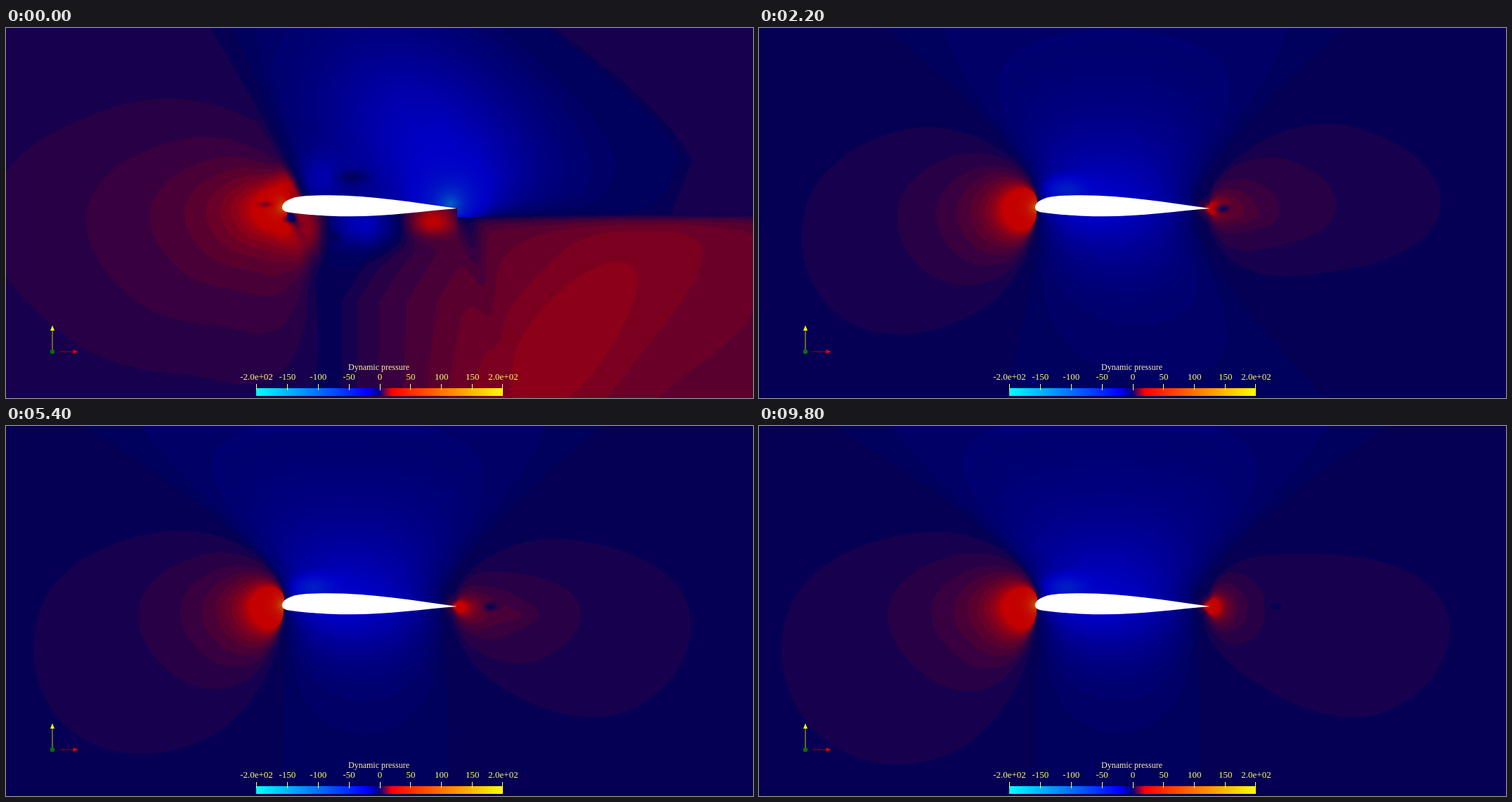
An HTML page with a canvas that plays this animation: 1063 px wide and 527 px high, repeating every 10000 ms.

```html
<!DOCTYPE html>
<html lang="en">
<head>
<meta charset="utf-8">
<title>Dynamic pressure</title>
<style>
html, body { margin: 0; width: 100%; height: 100%; overflow: hidden; background: #070055; }
canvas { display: block; width: 1063px; height: 527px; }
</style>
</head>
<body>
<canvas id="stage" width="1063" height="527"></canvas>
<script>
const W = 1063, H = 527, LOOP = 10000, STEP = 200;
const ctx = document.getElementById('stage').getContext('2d');
const image = ctx.createImageData(W, H);
const pixels = new Uint32Array(image.data.buffer);
const BINS = 1440;
const clamp = (v, a = 0, b = 1) => Math.min(b, Math.max(a, v));
const mix = (a, b, t) => a + (b - a) * t;
const bell = (x, y, cx, cy, sx, sy) => Math.exp(-(((x - cx) / sx) ** 2) - ((y - cy) / sy) ** 2);

// Each lobe has two contours as radii from straight up, over outwards, to straight down.
const leftKeys = [
  { t: 400, outer: [24, 125, 430, 600, 520, 245, 24], inner: [18, 95, 222, 280, 240, 160, 16], core: [3.2] },
  { t: 1400, outer: [20, 90, 230, 322, 295, 160, 17], inner: [16, 75, 145, 196, 180, 112, 13], core: [3.4] },
  { t: 3000, outer: [20, 88, 210, 335, 340, 187, 17], inner: [16, 72, 140, 198, 185, 125, 13], core: [3.4] },
  { t: 7200, outer: [20, 85, 205, 350, 362, 243, 18], inner: [16, 70, 140, 210, 190, 135, 13], core: [3.3] }
];
const rightKeys = [
  { t: 400, outer: [45, 118, 305, 325, 280, 130, 38], inner: [28, 98, 180, 195, 148, 92, 28], core: [2.3] },
  { t: 1400, outer: [20, 78, 182, 272, 112, 62, 22], inner: [16, 60, 115, 155, 75, 52, 16], core: [0.9] },
  { t: 3000, outer: [28, 95, 285, 385, 255, 132, 38], inner: [20, 75, 155, 205, 140, 78, 26], core: [1] },
  { t: 5400, outer: [24, 75, 190, 330, 290, 135, 40], inner: [18, 52, 95, 175, 145, 80, 28], core: [1] },
  { t: 7200, outer: [22, 68, 158, 310, 330, 150, 42], inner: [18, 42, 75, 170, 130, 75, 28], core: [1.1] },
  { t: 9800, outer: [22, 70, 150, 335, 295, 120, 45], inner: [20, 55, 72, 80, 78, 62, 28], core: [1.6] }
];
// edge: top left, top right, bottom left, bottom right of the suction zone.
// wake: vortex x, vortex strength, trailing bump.
const zoneKeys = [
  { t: 400, edge: [290, 740, 300, 710], wake: [644, 0, 0] },
  { t: 1400, edge: [190, 920, 320, 1000], wake: [652, 0.95, 0.5] },
  { t: 3000, edge: [150, 775, 360, 665], wake: [667, 0.95, 1.2] },
  { t: 5400, edge: [98, 865, 380, 645], wake: [689, 0.9, 1.6] },
  { t: 7200, edge: [95, 895, 385, 640], wake: [706, 0.9, 1.6] },
  { t: 9800, edge: [95, 905, 385, 645], wake: [735, 0.85, 0] }
];
const startLobe = {
  outer: [180, 280, 430, 600, 480, 370, 300],
  inner: [60, 120, 225, 343, 310, 235, 200],
  core: [1.7]
};

function poseAt(keys, t) {
  let i = 0;
  while (i < keys.length - 2 && t > keys[i + 1].t) i++;
  const a = keys[i], b = keys[i + 1];
  const k = clamp((t - a.t) / (b.t - a.t));
  const pose = {};
  for (const name in a) {
    if (name !== 't') pose[name] = a[name].map((v, j) => mix(v, b[name][j], k));
  }
  return pose;
}

// Log distance and angle bin of every pixel around one end of the wing.
function polar(cx, cy, side) {
  const log = new Float32Array(W * H), bin = new Uint16Array(W * H);
  for (let y = 0, i = 0; y < H; y++) {
    for (let x = 0; x < W; x++, i++) {
      const dx = (x + 0.5 - cx) * side, dy = y + 0.5 - cy;
      log[i] = Math.log(Math.hypot(dx, dy) + 0.01);
      bin[i] = Math.floor((Math.atan2(dy, dx) / Math.PI + 1) * BINS / 2) % BINS;
    }
  }
  return { log, bin };
}
const nose = polar(395, 255, -1);
const tail = polar(641, 257, 1);

function spline(list, u) {
  const i = Math.floor(u), f = u - i;
  const at = j => list[clamp(j, 0, list.length - 1)];
  const a = at(i - 1), b = at(i), c = at(i + 1), d = at(i + 2);
  return b + f / 2 * (c - a + f * (2 * a - 5 * b + 4 * c - d + f * (3 * (b - c) + d - a)));
}

function lobe(place, pose, back, heat) {
  const pad = (list, v) => [v, v, ...list, v, v];
  const outer = pad(pose.outer, back), inner = pad(pose.inner, back * 0.8);
  const l2 = new Float32Array(BINS), l3 = new Float32Array(BINS);
  const fall = new Float32Array(BINS), rise = new Float32Array(BINS);
  for (let i = 0; i < BINS; i++) {
    const u = clamp((i * 360 / BINS - 30) / 30, 0, 10);
    const r2 = Math.max(2.5, spline(inner, u));
    const r1 = Math.max(r2 * 1.15, spline(outer, u));
    const r3 = Math.min(r2 * 0.8, pose.core[0] * Math.sqrt(r2));
    l2[i] = Math.log(r2);
    l3[i] = Math.log(r3);
    fall[i] = Math.log(1.55 / 3.25) / Math.log(r1 / r2);
    rise[i] = Math.log(20 / 3.25) / Math.log(r2 / r3);
  }
  return i => {
    const l = place.log[i], b = place.bin[i];
    if (l < l3[b]) return 20 + heat * Math.exp(-Math.exp(l) / 7);
    const d = l - l2[b];
    return 3.25 * Math.exp(d > 0 ? d * fall[b] : -d * rise[b]);
  };
}

// Parts of the pressure right after the impulsive start.
function startAbove(x, y, left, right, line) {
  if (x > right) return 2.4;
  let p = -1 - 18 * bell(x, y, 590 + (y - 120) * 0.4, 175, 155, 165)
    - 10 * bell(x, y, 447, 215, 30, 35) + 9 * bell(x, y, 493, 212, 24, 10);
  p *= clamp((right - x) / 130) * clamp((x - left) / (10 + 0.12 * (240 - y)));
  if (x > 641) p *= 1 - Math.exp(-(line - y) / mix(6, 25, clamp((x - 641) / 120)));
  return p - 95 * Math.exp(-Math.hypot(x - 632, y - 250) / 20);
}

function startBelow(x, y, line) {
  const foot = 468 + 55 * clamp((390 - y) / 90);
  let p = 9.3 * Math.pow(clamp((x - foot) / 180), 0.6)
    + 5.5 * bell(x, y, 790 - (y - 450) * 0.45, 460, 115, 170) + 2 * bell(x, y, 960, 300, 130, 160);
  if (x > 641) p *= 1 - Math.exp(-(y - line) / 9);
  p += 14 * bell(x, y, 605, 275, 32, 20);
  p *= 1 - Math.exp(-(((x - 652 - (y - 262) * 0.25) / 15) ** 2) - Math.max(0, y - 262) / 60);
  return p - 18 * bell(x, y, 508, 279, 46, 30) + 5 * bell(x, y, 467, 295, 9, 9);
}

function startAhead(x, y, left, base) {
  let p = 1.3 * base + 12 * bell(x, y, 405, 222, 26, 22) + 14 * bell(x, y, 427, 288, 24, 42);
  p = Math.min(p, 20 + 110 * Math.exp(-Math.hypot(x - 395, y - 255) / 8));
  p *= y > 250 ? clamp((467 - x) / 24) : clamp((left - x) / (10 + 0.12 * (240 - y)));
  p -= 26 * bell(x, y, 400, 269, 10, 8) + 13 * bell(x, y, 374, 251, 14, 5);
  return p > -0.5 ? Math.max(0.8, p) : p;
}

function startField() {
  const field = new Float32Array(W * H);
  const front = lobe(nose, startLobe, 40, 110);
  for (let y = 0, i = 0; y < H; y++) {
    const left = 425 - 0.43 * (240 - y);
    const right = y > 190 ? 975 - (y - 190) * 0.38
      : 975 - 195 * Math.pow((190 - y) / 190, 1.35);
    for (let x = 0; x < W; x++, i++) {
      const line = x > 641 ? 264 + 6 * Math.exp((641 - x) / 120) : 256;
      if (y < line && x > left) field[i] = startAbove(x, y, left, right, line);
      else if (x > 460 && y > 240) field[i] = startBelow(x, y, line);
      else field[i] = startAhead(x, y, left, front(i));
    }
  }
  return field;
}
const start = startField();

function shade(p) {
  if (p > -4 && p < 16) p = 1.55 + 1.7 * (Math.floor((p - 1.55) / 1.7) + 0.5);
  const m = Math.abs(p), f = Math.min(1, m / 20);
  const g = m > 20 ? 196 * Math.min(1, (m - 20) / 180) : 0;
  const r = p > 0 ? 196 * f : 0;
  const b = p > 0 ? 88 * (1 - f) : 88 + 110 * f;
  return (255 << 24 | b << 16 | g << 8 | r) >>> 0;
}

function paintField(t) {
  const front = lobe(nose, poseAt(leftKeys, t), 4, 120);
  const rear = lobe(tail, poseAt(rightKeys, t), 18, 0);
  const { edge, wake } = poseAt(zoneKeys, t);
  const early = t < 200 ? 1 : t < 400 ? 0.4 : 0;
  for (let y = 0, i = 0; y < H; y++) {
    const up = Math.pow(clamp((240 - y) / 240), 1.35);
    const down = Math.pow(clamp((y - 280) / 247), 1.35);
    const xl = 398 + (edge[0] - 398) * up + (edge[2] - 398) * down;
    const xr = 624 + (edge[1] - 624) * up + (edge[3] - 624) * down;
    const d = Math.abs(y - 250);
    const depth = 25 / (1 + (d / (y < 250 ? 130 : 112)) ** 2);
    const el = 10 + 0.75 * d, er = 60 + 0.6 * d;
    for (let x = 0; x < W; x++, i++) {
      let p = 0;
      if (early < 1) {
        if (x < 520) p += front(i);
        if (x > 520) p += rear(i);
        if (x > 630 && x < 830 && y > 220 && y < 320) {
          p += wake[2] * bell(x, y, wake[0] + 36, 269, 34, 14);
          p *= 1 - wake[1] * bell(x, y, wake[0], 257, 10, 6);
        }
        if (x > xl && x < xr) {
          p -= depth * (1 - Math.exp((xl - x) / el)) * (1 - Math.exp((x - xr) / er));
          if (d < 50 && x < 510) p -= 28 * bell(x, y, 435, 229, 26, 14);
        } else {
          p = Math.max(0.8, p);
        }
      }
      if (early) p = mix(p, start[i], early);
      pixels[i] = shade(p);
    }
  }
  ctx.putImageData(image, 0, 0);
}

function fillPath(color, d) {
  ctx.fillStyle = color;
  ctx.fill(new Path2D(d));
}

function paintWing() {
  fillPath('#fff', 'M393 255.5C393 250 398 246 406 243C416 239 435 238.3 460 238.3'
    + 'C520 238.3 580 248.5 642 257C595 260.7 545 268.3 490 268.3'
    + 'C450 268.3 420 265 402 262.5C396 261.5 393 259 393 255.5Z');
}

function paintAxes() {
  ctx.fillStyle = '#c8c800';
  ctx.fillRect(65.5, 431, 1, 28);
  fillPath('#ffff00', 'M66 423.5L69 431H63Z');
  ctx.fillStyle = '#a00000';
  ctx.fillRect(76, 460.5, 20, 1);
  fillPath('#e00000', 'M103 461L95.5 464V458Z');
  fillPath('#0a6e0a', 'M62.7 461a3.3 3.3 0 1 0 6.6 0a3.3 3.3 0 1 0 -6.6 0Z');
}

function paintLegend() {
  const x0 = 356, x1 = 707;
  const ramp = ctx.createLinearGradient(x0, 0, x1, 0);
  const stops = [[0, '#00ffff'], [0.45, '#0000ff'], [0.5, '#000080'], [0.55, '#ff0000'], [1, '#ffff00']];
  for (const [at, color] of stops) ramp.addColorStop(at, color);
  ctx.fillStyle = ramp;
  ctx.fillRect(x0, 513, x1 - x0, 11);
  ctx.textAlign = 'center';
  ctx.fillStyle = '#fff0a0';
  ctx.font = '12px "Liberation Serif", serif';
  ctx.fillText('Dynamic pressure', 530.5, 487);
  ctx.fillStyle = '#ffff6a';
  ctx.font = '13px "Liberation Serif", serif';
  for (let i = 0; i <= 8; i++) {
    const x = mix(x0, x1, i / 8);
    const label = i === 0 ? '-2.0e+02' : i === 8 ? '2.0e+02' : String(i * 50 - 200);
    ctx.fillText(label, x + 0.5, 501);
    ctx.fillRect(Math.round(x) - (i === 8 ? 1 : 0), 507, 1, 9);
  }
}

let shown = -1;
function tick(now) {
  const t = Math.floor((now % LOOP) / STEP) * STEP;
  if (t !== shown) {
    shown = t;
    paintField(t);
    paintWing();
    paintAxes();
    paintLegend();
  }
  requestAnimationFrame(() => tick(performance.now()));
}
tick(0);
</script>
</body>
</html>
```
